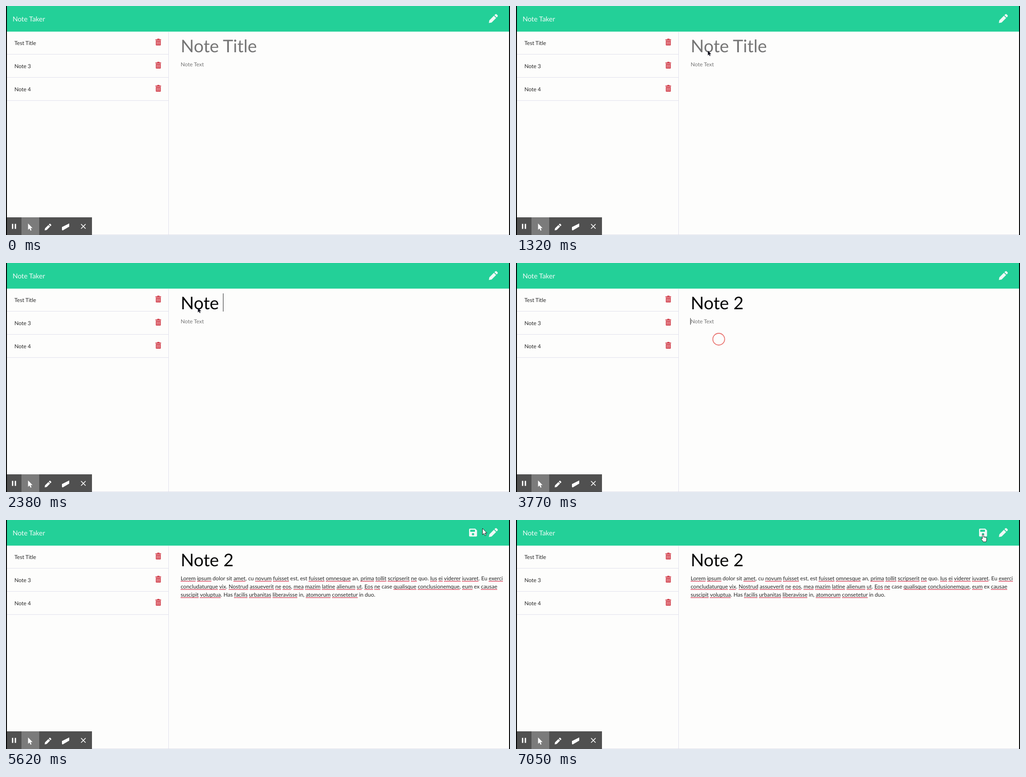
An HTML page that plays this animation: 1108x505 px, repeating every 8000 ms.

```html
<!DOCTYPE html>
<html lang="en">
<head>
<meta charset="utf-8">
<title>Note Taker</title>
<style>
html, body { margin: 0; width: 100%; height: 100%; overflow: hidden; background: #fdfdfc; }
svg { display: block; width: 100%; height: 100%; }
text { font: 12px Lato, sans-serif; fill: #262626; white-space: pre; text-rendering: geometricPrecision; }
.brand { font-size: 15px; fill: #f2fbf8; }
.title { font-size: 38.4px; fill: #050505; }
.hint { fill: #757575; }
.rule { stroke: #e0e0ec; }
.caret { stroke: #222; }
.wave { stroke: #d3304a; stroke-width: 1.5; stroke-dasharray: 2.7 .5; }
.icon { fill: #eef8f5; }
.cursor { fill: #fff; stroke: #222; stroke-linejoin: round; }
.dark { fill: #10101c; stroke: none; }
</style>
</head>
<body>
<svg viewBox="0 0 1108 505">
  <defs>
    <path id="arrow" d="M0 0V14L3.2 11 5.4 16 7.6 15 5.5 10.2H9.8Z"/>
    <path id="pencil" d="M0 20 1.1 14 11.1 4 16 8.9 6 18.9ZM12.3 2.8 14.3 .8Q15.6-.5 16.9 .8L19.2 3.1Q20.5 4.4 19.2 5.7L17.2 7.7Z"/>
    <g id="trash">
      <path fill="#d2414d" d="M332 73.6 333 72H337L338 73.6H341V75.4H328.5V73.6ZM329.4 76.3H340.3V85.7Q340.3 87 339 87H330.7Q329.4 87 329.4 85.7Z"/>
      <path stroke="#f6d4d6" d="M332.1 78V85.3M334.9 78V85.3M337.7 78V85.3"/>
    </g>
  </defs>

  <rect width="1108" height="505" fill="#fdfdfc"/>
  <rect width="1108" height="56.5" fill="#23d098"/>
  <text class="brand" x="14.5" y="34">Note Taker</text>
  <use href="#pencil" class="icon" x="1061.5" y="17.5"/>
  <g id="save">
    <path class="icon" d="M1020 19H1031.5L1035.5 23V34.5Q1035.5 36.5 1033.5 36.5H1020Q1018 36.5 1018 34.5V21Q1018 19 1020 19Z"/>
    <path fill="#23d098" d="M1020.5 21.5H1031V26H1020.5Z"/>
    <circle cx="1026.7" cy="31.2" r="2.5" fill="#23d098"/>
  </g>

  <g id="list"></g>
  <path class="rule" d="M357.5 57V505M2 504.5H1106"/>

  <text id="titleHint" class="title hint" x="384" y="102">Note Title</text>
  <text id="title" class="title" x="384" y="102"></text>
  <text id="bodyHint" class="hint" x="384" y="133">Note Text</text>
  <g id="body"></g>
  <g id="waves"></g>
  <path id="titleCaret" class="caret" d="M0 67V107"/>
  <path id="bodyCaret" class="caret" d="M0 0V14.5"/>
  <circle id="ripple" cx="445.7" cy="168" fill="none" stroke="#e9736f" stroke-width="1.8"/>

  <rect x="2" y="466" width="187" height="39" fill="#505050"/>
  <rect x="34" y="466" width="39" height="39" fill="#7b7b7b"/>
  <g fill="#fff">
    <path d="M13 480.5H16V491.5H13ZM19.2 480.5H22.2V491.5H19.2Z"/>
    <use href="#arrow" x="48.5" y="479.5"/>
    <use href="#pencil" transform="translate(85 480) scale(.74)"/>
    <path d="M123 487.5 139 479.5V486.5L125.5 494.5Q123 495.5 123 493Z"/>
    <path stroke="#fff" stroke-width="1.7" d="M165 481 175 491M175 481 165 491"/>
  </g>
  <path d="M0 0H2V505H0ZM1106 0H1108V505H1106Z"/>

  <use id="pointer" href="#arrow" class="cursor"/>
  <use id="darkPointer" href="#arrow" class="dark"/>
  <path id="hand" class="cursor" d="M3 9.2V1.6Q3 0 4.4 0T5.8 1.6V5.8Q9.5 5.4 12.4 7.4V11Q12.4 13.6 11 16.2H4.8Q3.6 13.8 .4 10.2Q.2 8 3 9.2Z"/>
</svg>
<script>
const LOOP = 8000;
const LEFT = 384;
const $ = id => document.getElementById(id);

function add(parent, tag, attrs, text = '') {
  const el = document.createElementNS('http://www.w3.org/2000/svg', tag);
  for (const name in attrs) el.setAttribute(name, attrs[name]);
  el.textContent = text;
  parent.append(el);
  return el;
}

['Test Title', 'Note 3', 'Note 4'].forEach((name, i) => {
  const y = i * 51;
  add($('list'), 'text', { x: 18.5, y: 86.3 + y }, name);
  add($('list'), 'use', { href: '#trash', y });
  add($('list'), 'path', { class: 'rule', d: `M2 ${106.5 + y}H357` });
});

const known = new Set('dolor sit cu est an quo Eu case ex Has in duo'.split(' '));
const lines = [
  'Lorem ipsum dolor sit amet, cu novum fuisset est, est fuisset omnesque an, prima tollit scripserit ne quo. Ius ei viderer iuvaret. Eu exerci',
  'concludaturque vix. Nostrud assueverit ne eos, mea mazim latine alienum ut. Eos ne case qualisque conclusionemque, eum ex causae',
  'suscipit voluptua. Has facilis urbanitas liberavisse in, atomorum consetetur in duo.'
].map((line, i) => {
  const y = 133 + i * 18;
  const el = add($('body'), 'text', { x: LEFT, y }, line);
  for (const { 0: word, index } of line.matchAll(/\w+/g)) {
    if (known.has(word)) continue;
    const from = el.getStartPositionOfChar(index).x;
    const to = el.getEndPositionOfChar(index + word.length - 1).x;
    add($('waves'), 'path', { class: 'wave', d: `M${from} ${y + 2.2}H${to}` });
  }
  return el;
});
const bodyEnd = LEFT + lines[2].getComputedTextLength();

const typing = [
  [0, ''], [1380, 'N'], [1700, 'No'], [1930, 'Not'],
  [2100, 'Note'], [2330, 'Note '], [2870, 'Note 2']
];
// time, kind, x, y
const moves = [
  [0, ''],
  ...Array.from({ length: 6 }, (_, i) => [50 + i * 50, 'pointer', 1000 - i * 97, 52 + i * 3]),
  [350, 'darkPointer', 421.8, 67], [900, 'darkPointer', 421.8, 96], [1070, 'darkPointer', 421.8, 98.5],
  [3380, ''],
  [5220, 'pointer', 887, 43.5], [5620, 'pointer', 1047.5, 18.5],
  [5870, 'pointer', 1043, 21], [5930, 'pointer', 1038, 25], [6000, 'hand', 1029, 31],
  [6060, 'hand', 1027, 34], [6120, 'hand', 1025, 36], [6180, 'hand', 1024, 37],
  [6380, 'hand', 1022.3, 32]
];
const ripples = [[0, 0], [3770, 13], [3820, 15.5], [3850, 0]];

const current = (table, t) => table.findLast(row => row[0] <= t);
const within = (t, from, to) => t >= from && t < to;
const show = (id, on) => { $(id).style.display = on ? '' : 'none'; };

function draw(t) {
  const typed = current(typing, t)[1];
  $('title').textContent = typed;
  show('titleHint', !typed);
  show('titleCaret', within(t, 1380, 3380));
  const caretX = Math.floor(LEFT + $('title').getComputedTextLength()) + .5;
  $('titleCaret').setAttribute('transform', `translate(${caretX})`);

  const pasted = t >= 4550;
  show('bodyHint', !pasted);
  show('body', pasted);
  show('waves', t >= 4830);
  show('save', t >= 4830);
  show('bodyCaret', within(t, 3770, 4230) || within(t, 4550, 5220));
  $('bodyCaret').setAttribute('transform', pasted
    ? `translate(${Math.round(bodyEnd) + .5} 157)` : `translate(${LEFT - .5} 121.5)`);

  const radius = current(ripples, t)[1];
  show('ripple', radius);
  $('ripple').setAttribute('r', radius);

  const [, kind, x, y] = current(moves, t);
  for (const id of ['pointer', 'darkPointer', 'hand']) show(id, id === kind);
  if (kind) {
    const scale = kind === 'darkPointer' ? .75 : 1;
    $(kind).setAttribute('transform', `translate(${x} ${y}) scale(${scale})`);
  }
}

const start = performance.now();
function frame() {
  draw((performance.now() - start) % LOOP);
  requestAnimationFrame(frame);
}
frame();
</script>
</body>
</html>
```
